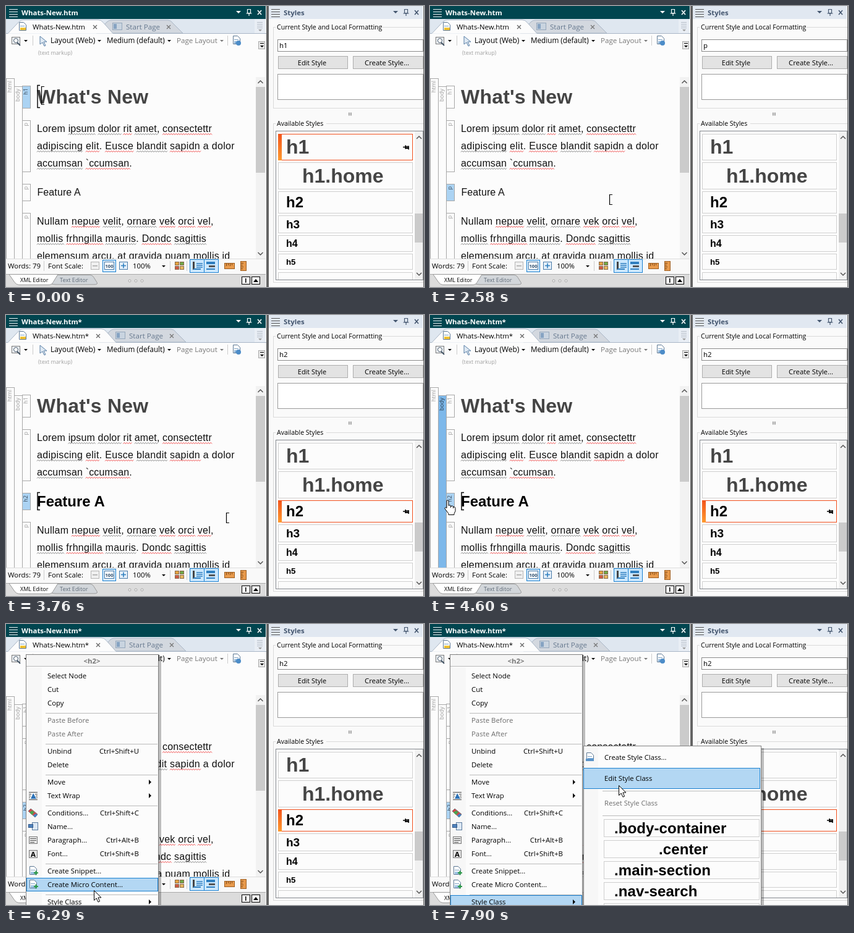
Animation of 676x455 px, one loop 8000 ms. Source, as an HTML page:

```html
<!DOCTYPE html>
<html lang="en">
<head>
<meta charset="utf-8">
<title>Editor</title>
<style>
html, body { margin: 0; width: 100%; height: 100%; overflow: hidden; background: #fcfcfc; }
svg { display: block; width: 676px; height: 455px; }
text { font-family: "Open Sans", "Noto Sans", sans-serif; white-space: pre; }
.doc { font-family: "Liberation Sans", Arial, sans-serif; }
</style>
</head>
<body>
<svg id="stage" viewBox="0 0 676 455" xmlns="http://www.w3.org/2000/svg"></svg>
<script>
const LOOP = 8000;
const TEAL = '#00454f', BLUE = '#b3d7f3', EDGE = '#1a80d0', PAPER = '#fcfcfc', INK = '#000';

// Markup helpers
const esc = s => s.replace(/</g, '&lt;').replace(/>/g, '&gt;');
const fill = (x, y, w, h, c, more = '') =>
  `<rect x="${x}" y="${y}" width="${w}" height="${h}" fill="${c}" ${more}/>`;
const box = (x, y, w, h, c, line) =>
  fill(x + .5, y + .5, w - 1, h - 1, c, `stroke="${line}"`);
const path = (d, c = 'none', line = 'none', w = 1) =>
  `<path d="${d}" fill="${c}" stroke="${line}" stroke-width="${w}"/>`;
const text = (x, y, s, { size = 11.4, color = INK, bold, anchor = 'start', more = '' } = {}) =>
  `<text x="${x}" y="${y}" font-size="${size}" fill="${color}" font-weight="${bold ? 700 : 400}" text-anchor="${anchor}" ${more}>${esc(s)}</text>`;
const doc = (x, y, s, size, bold, color = '#000', gap = 0) =>
  text(x, y, s, { size, bold, color, more: `class="doc" letter-spacing="${gap}"` });
const during = (a, b, inner) => `<g data-a="${a}" data-b="${b}">${inner}</g>`;
const group = (id, inner) => `<g id="${id}">${inner}</g>`;
const shift = (dx, dy, inner) => `<g transform="translate(${dx} ${dy})">${inner}</g>`;
const down = (x, y, c = INK, r = 3) => path(`M${x - r} ${y}h${2 * r}l${-r} ${r}z`, c);
const cross = (x, y, c) => path(`M${x - 3} ${y - 3}l6 6m0 -6l-6 6`, 'none', c, 1.3);
const chevron = (x, y, dir) => path(`M${x - 4} ${y + 2 * dir}l4 ${-4 * dir}l4 ${4 * dir}`, 'none', '#555', 1.5);
const vline = (x, y, h, c = '#ccc') => fill(x, y, 1, h, c);

function titleBar(x, w, name, active) {
  const c = active ? '#fff' : '#44566f';
  const r = x + w;
  return fill(x, 0, w, 21, active ? TEAL : '#e1e8f1') +
    path(`M${x + 5} 5.5h14m-14 4h14m-14 4h14m-14 4h14`, 'none', active ? '#e8eef0' : '#555') +
    text(x + 25, 15, name, { bold: true, color: c }) +
    down(r - 44, 8, c, 4) +
    path(`M${r - 29.5} 5.5h5v6h-5zm-2 6.5h9m-4.5 0v4`, 'none', c, 1.2) +
    path(`M${r - 13} 7l6 7m0 -7l-6 7`, 'none', c, 1.6);
}

const page = (x, y, c) =>
  path(`M${x + .5} ${y + .5}h7l4 4v9h-11z`, '#fff', '#5d7894') +
  fill(x + 2, y + 6, 7, 1, '#7fa3c4') + fill(x + 2, y + 9, 9, 4, c);

function tabs(dirty) {
  const d = dirty ? 5 : 0;
  return path(`M${146 + d} 44l17 -18q3 -3 7 -3h${92}q5 0 8 5l16 16z`, '#d3d8df', '#a9b6c6') +
    path(`M0 44.5h3l18 -19q3 -3 7 -3h${121 + d}q5 0 8 4l16 18h250`, PAPER, '#a9b6c6') +
    page(21, 26, '#f2c232') +
    text(43, 38, dirty ? 'Whats-New.htm*' : 'Whats-New.htm') +
    cross(144 + d, 34, '#666') +
    shift(d, 0, box(172, 27, 16, 12, '#c9d4e0', '#95a7bb') + fill(174, 29, 5, 8, '#86a3c2') +
      text(194, 38, 'Start Page', { size: 11.6, color: '#66788e' }) + cross(263, 34, '#777'));
}

function toolbar() {
  const grey = '#777';
  return fill(0, 45, 420, 26, PAPER) +
    box(9, 50, 14, 12, '#eef3f8', '#777') + `<circle cx="16" cy="56" r="3.5" fill="#fff" stroke="#456"/>` +
    path('M18 59l5 5', 'none', '#456', 2) + down(32, 55) + vline(43, 48, 16) +
    path('M55 49v13l4 -3l3 6l2 -1l-3 -6h5z', '#dfe9f3', '#587ea5') +
    text(72, 60, 'Layout (Web)', { size: 11.9 }) + down(151, 55) +
    text(163, 60, 'Medium (default)', { size: 11.7 }) + down(264, 55) +
    text(276, 60, 'Page Layout', { color: grey, size: 11.6 }) + down(349, 55, grey) + vline(358, 48, 16) +
    page(367, 48, '#8fb6da') + `<circle cx="376" cy="60" r="4" fill="#4c8cc8"/>` +
    box(408, 57, 11, 13, '#e8e8e8', '#aaa') + fill(411, 60, 6, 1, INK) + down(414, 64) +
    text(52, 79, '(text markup)', { size: 8.8, color: '#a0a0a0' });
}

function tag(x, y, h, name, c = PAPER, ink = '#999') {
  return box(x, y, 14, h, c, '#a8a8a8') +
    `<g transform="translate(${x + 8.5} ${y + 4}) rotate(-90)">` +
    text(0, 0, name, { size: 9, color: ink, anchor: 'end' }) + '</g>';
}

const caret = (y, h, c = '#000') => path(`M55 ${y + .5}h-4v${h}h4`, 'none', c, 1.4);

// "*" marks a red underline, "~" a dark one
const LINES = [
  [204, 'Lorem ~ipsum ~dolor *rit ~amet, *consectettr', .14],
  [232, '~adipiscing *elit. *Eusce ~blandit *sapidn a dolor', .31],
  [260, '~accumsan *`ccumsan.', .15],
  [354, 'Nullam *nepue ~velit, ~ornare *vek *orci *vel,', .25],
  [382, '~mollis *frhngilla ~mauris. *Dondc ~sagittis', .28],
  [410, '~elemensum *arcu, at ~gravida *puam ~mollis id', .2]
];

function editor() {
  return fill(0, 71, 420, 339, PAPER) + toolbar() +
    tag(0, 117, 293, 'html') + tag(13, 130, 280, 'body') +
    during(4460, 4880, tag(13, 130, 280, 'body', '#7db8ea', '#234')) +
    tag(26, 129, 37, 'h1') + during(0, 1620, tag(26, 129, 37, 'h1', '#abd3f3', '#345')) +
    tag(26, 185, 84, 'p') + tag(26, 335, 75, 'p') +
    during(0, 1620, tag(26, 288, 28, 'p')) +
    during(1620, 3360, tag(26, 288, 28, 'p', '#abd3f3', '#345')) +
    during(3360, LOOP, tag(26, 288, 28, 'h2', '#abd3f3', '#345')) +
    doc(50, 158, "What's New", 32, true, '#454545', .2) +
    LINES.map(([y, s, gap]) => doc(50, y, s.replace(/[*~]/g, ''), 16, false, '#111', gap)
      .replace('<text', `<text data-line="${y}"`)).join('') +
    group('waves', '') +
    during(0, 3360, doc(50.5, 307, 'Feature A', 16, false, '#111', .1)) +
    during(3360, LOOP, doc(50, 310, 'Feature A', 24, true)) +
    during(0, 150, caret(128, 36)) + during(680, 1210, caret(128, 36)) +
    during(1620, 2180, caret(289, 23)) + during(2730, 3120, caret(289, 23)) +
    during(3120, 3360, path('M53 290.5h-3v22h3', 'none', '#999')) +
    during(3360, 3880, caret(287, 28)) + during(4320, 4880, caret(287, 28)) + during(5130, LOOP, caret(287, 28)) +
    fill(404, 115, 16, 295, '#f2f2f2') + fill(404, 131, 15, 139, '#cbcbcb') +
    chevron(411.5, 123, 1) + chevron(411.5, 401, -1);
}

function footer() {
  const blue = '#2f7fc0';
  const rows = (x, y) => path(`M${x} ${y}h10m-10 3h10m-10 3h10`, 'none', blue, 1.4);
  return fill(0, 410, 420, 24, '#f9f9f9') + fill(0, 409, 420, 1, '#ddd') +
    text(3, 425, 'Words: 79') + vline(61, 413, 16) + text(68, 425, 'Font Scale:') +
    box(137, 414, 14, 13, '#f0f0f0', '#b5b5b5') + fill(140, 420, 8, 1.5, '#aaa') +
    box(156, 411, 22, 20, '#d9ebfa', EDGE) + box(159, 414, 16, 13, '#fff', '#4a7ba8') +
    text(167, 424, '100', { size: 7.5, bold: true, color: '#246', anchor: 'middle' }) +
    box(183, 414, 14, 13, '#e5f0fa', '#4a7ba8') + path('M186 420.5h8m-4 -4v8', 'none', blue, 1.6) +
    text(205, 425, '100%') + down(255, 420) + vline(265, 413, 16) +
    [[273, 414, '#e3a340'], [281, 414, '#6ea848'], [273, 421, '#cf5a46'], [281, 421, '#e8b860']]
      .map(([x, y, c]) => box(x, y, 7, 6, c, '#8a6a4a')).join('') +
    vline(292, 413, 16) +
    box(297, 410, 24, 22, '#cce8ff', EDGE) + fill(302, 414, 3, 13, '#444') + rows(308, 417) + fill(303, 425, 12, 2, blue) +
    box(320, 410, 24, 22, '#cce8ff', EDGE) + fill(324, 414, 14, 4, blue) + fill(328, 420, 10, 3, '#555') + fill(324, 425, 14, 2, blue) +
    box(353, 416, 17, 10, '#e89a4c', '#9e5f22') + path('M356.5 417v4m3 -4v3m3 -3v4m3 -4v3', 'none', '#7a4514') +
    box(379, 413, 10, 16, '#e89a4c', '#9e5f22') + path('M380 416.5h4m-4 3h3m-3 3h4m-4 3h3', 'none', '#7a4514') +
    fill(0, 434, 420, 21, '#dcdcdc') + fill(0, 434, 420, 1, '#aaa') +
    path('M72 450l9 -14.5h55q4 0 6 4l5 8q2 3.5 -4 3.5h-63z', '#d2d6da', '#999') +
    path('M5 434.5l9 13q3 4 7 4h49q4 0 6 -4l8 -13z', '#fff', '#999') +
    text(23, 446.5, 'XML Editor', { size: 9 }) + text(87, 446.5, 'Text Editor', { size: 9.2, color: '#5f6b78' }) +
    [200, 210, 220].map(x => `<circle cx="${x}" cy="445" r="2" fill="#eee" stroke="#aaa"/>`).join('') +
    box(381, 438, 14, 13, '#f4f4f4', INK) + fill(387, 441, 1.5, 7, INK) +
    box(397, 438, 14, 13, '#f4f4f4', INK) + path('M400 447h8l-4 -5z', INK);
}

const ROWS = [
  [207, 43, 'h1', 453, 239, 32, '#454545'], [253, 44, 'h1.home', 479, 286, 32, '#454545'],
  [300, 36, 'h2', 453, 326, 24], [339, 29, 'h3', 453, 360, 19],
  [371, 27, 'h4', 453, 390, 16], [401, 26, 'h5', 453, 419, 13.3]
];
const pin = y => path(`M642 ${y}h4m0 -3v6m0 -2h5m0 -3v6m0 -5h-5v3h5`, 'none', '#000', 1.6);
const picked = (y, h) => box(440, y, 218, h, PAPER, '#f04e1c') +
  fill(440, y, 6, h, 'url(#ember)') + pin(y + h / 2);

function styles() {
  const frame = (y, h) => box(432, y, 250, h, 'none', '#dadada');
  const label = (y, s, w) => fill(436, y - 10, w, 13, '#fafafa') + text(438, y, s, { size: 10.55 });
  const [h1, , h2] = ROWS;
  return fill(425, 21, 251, 434, '#fafafa') +
    frame(34, 132) + label(38, 'Current Style and Local Formatting', 172) +
    box(439, 54, 236, 20, '#fff', '#8a8a8a') +
    [['h1', 0, 1770], ['p', 1770, 3360], ['h2', 3360, LOOP]]
      .map(([s, a, b]) => during(a, b, text(442, 68, s))).join('') +
    box(440, 81, 113, 21, '#e3e3e3', '#adadad') + text(495, 96, 'Edit Style', { size: 10.9, anchor: 'middle' }) +
    box(561, 81, 114, 21, '#e3e3e3', '#adadad') + text(616, 96, 'Create Style...', { anchor: 'middle' }) +
    box(439, 110, 236, 42, '#fff', '#9a9a9a') +
    path('M554.5 172.5v5m2 -5v5m2 -5v5', 'none', '#888') +
    frame(190, 258) + label(194, 'Available Styles', 82) +
    box(436, 202, 239, 242, '#fff', '#82868c') +
    ROWS.map(([y, h]) => box(440, y, 218, h, PAPER, '#cfcfcf')).join('') +
    path('M440.5 443v-11.5h217v11.5', PAPER, '#cfcfcf') +
    during(0, 1770, picked(h1[0], h1[1])) +
    group('rowHover', box(440, 300, 218, 36, '#fcfdff', '#9ab') + fill(440, 300, 6, 36, '#7fb8ec') + pin(318)) +
    during(3360, LOOP, picked(h2[0], h2[1])) +
    ROWS.map(([, , s, x, y, size, c]) => doc(x, y, s, size, true, c)).join('') +
    fill(661, 203, 13, 240, '#f1f1f1') + fill(661, 336, 13, 47, '#cbcbcb') +
    chevron(668, 213, 1) + chevron(668, 434, -1);
}

// baseline, label, shortcut ('>' opens a submenu), disabled
const ITEMS = [
  [88, 'Select Node'], [110, 'Cut'], [132, 'Copy'],
  [160, 'Paste Before', '', 1], [182, 'Paste After', '', 1],
  [210, 'Unbind', 'Ctrl+Shift+U'], [232, 'Delete'],
  [260, 'Move', '>'], [282, 'Text Wrap', '>'],
  [310, 'Conditions...', 'Ctrl+Shift+C'], [332, 'Name...'],
  [354, 'Paragraph...', 'Ctrl+Alt+B'], [376, 'Font...', 'Ctrl+Shift+B'],
  [404, 'Create Snippet...'], [426, 'Create Micro Content...'], [454, 'Style Class', '>']
];

function menu() {
  const item = ([y, s, key, off]) => {
    const color = off ? '#6d6d6d' : INK;
    return text(67, y, s, { color }) + (key === '>' ? path(`M231 ${y - 8}v8l4 -4z`, INK)
      : key ? text(215, y, key, { anchor: 'end' }) : '');
  };
  const green = y => page(38, y, '#9fc4e4') + path(`M45 ${y + 11}h7m-3.5 -3.5v7`, 'none', '#2c9c46', 2);
  return fill(36, 53, 215, 402, '#000', 'opacity=".25"') + box(32, 49, 215, 420, PAPER, '#808080') +
    fill(33, 70, 25, 385, '#f7f7f7') + fill(33, 50, 213, 19, '#f5f5f5') + fill(33, 68, 213, 1, '#bbb') +
    text(139, 64, '<h2>', { bold: true, color: '#777', anchor: 'middle' }) +
    fill(33.5, 0, 212, 21, BLUE, `id="itemHover" stroke="${EDGE}"`) +
    [144, 194, 244, 294, 388, 438].map(y => fill(64, y, 181, 1, '#bbb')).join('') +
    ITEMS.map(item).join('') +
    path('M37 272.5h14m-14 3h4m6 0h4m-14 3h3m8 0h3m-14 3h2m10 0h2m-14 3h14', 'none', '#444') +
    path('M40 283l4 -9l5 9z', '#2d73b8') +
    path('M36 303l4 -4l11 9l-4 5z', '#d9434a', '#777') + path('M38 305l4 -3l4 3l-4 4z', '#4aa350') + path('M44 310l4 -3l3 2l-4 4z', '#4285c5') +
    box(42, 321, 10, 13, '#dce8f4', '#5d7da0') + box(36, 324, 8, 6, '#4f83bd', '#34598a') +
    box(37, 344, 14, 12, '#e9e9e9', '#777') + path('M39 347.5h10m-10 3h10m-10 3h7', 'none', '#555') +
    box(37, 366, 14, 13, '#e4e4e4', '#777') + text(44, 377, 'A', { bold: true, anchor: 'middle' }) +
    green(392) + green(414);
}

function submenu() {
  const names = [['.body-container', 298], ['.center', 370], ['.main-section', 298], ['.nav-search', 298]];
  return fill(252, 201, 288, 254, '#000', 'opacity=".25"') + box(248, 197, 288, 270, PAPER, '#808080') +
    fill(249, 198, 23, 257, '#f7f7f7') +
    fill(248.5, 0, 285, 33, BLUE, `id="subHover" stroke="${EDGE}"`) +
    page(253, 208, '#7fb0de') + fill(252, 218, 13, 4, '#5b93c8') +
    text(282, 220, 'Create Style Class...', { size: 11.2 }) + text(282, 254, 'Edit Style Class', { size: 11.2 }) +
    text(282, 294, 'Reset Style Class', { size: 11.2, color: '#6d6d6d' }) +
    fill(279, 270, 255, 1, '#bbb') + fill(279, 310, 255, 1, '#bbb') +
    names.map(([s, x], i) => box(281, 316 + 34 * i, 252, 29, PAPER, '#cfcfcf') +
      doc(x, 339 + 34 * i, s, 24, true, INK, .1)).join('') +
    box(281, 452, 252, 29, PAPER, '#cfcfcf');
}

const stage = document.getElementById('stage');
const $ = id => document.getElementById(id);
stage.innerHTML =
  `<defs><linearGradient id="ember" x2="0" y2="1"><stop stop-color="#f2541c"/><stop offset="1" stop-color="#ff9a2e"/></linearGradient></defs>` +
  fill(0, 0, 676, 455, PAPER) + fill(0, 21, 420, 24, '#dfe7f0') +
  during(0, 3360, tabs(false)) + during(3360, LOOP, tabs(true)) +
  fill(402, 21, 18, 23, '#e9eef5') + path('M406 26.5h9m-9 3h9m-9 3h9m-9 3h9', 'none', '#b4bcc6') + down(411, 38, '#999') +
  editor() + footer() + styles() +
  during(0, 3120, titleBar(0, 420, 'Whats-New.htm', true) + titleBar(424, 250, 'Styles', false)) +
  during(3120, 3360, titleBar(0, 420, 'Whats-New.htm', false) + titleBar(424, 250, 'Styles', true)) +
  during(3360, LOOP, titleBar(0, 420, 'Whats-New.htm*', true) + titleBar(424, 250, 'Styles', false)) +
  fill(421, 0, 4, 455, '#646464') + vline(675, 0, 455, '#646464') +
  during(5430, LOOP, menu()) + during(6840, LOOP, submenu()) +
  group('beam', '') +
  group('arrow', path('M.5 .5v16l3.7 -3.5l2.8 6.2l2.6 -1.2l-2.7 -6h5z', '#fff', '#000')) +
  group('hand', path('M5 1.5q2 -2 3 1v7q3 -2 4 1q3 -1 4 1q3 0 3 3v4l-2 4v2h-9v-2l-6 -8q0 -3 3 -1z', '#fff', '#000') +
    path('M11.5 10v3m4 -2v3', 'none', '#000'));

function drawWaves() {
  let out = '';
  for (const [y, line, gap] of LINES) {
    const node = stage.querySelector(`[data-line="${y}"]`);
    let at = 0;
    for (const word of line.split(' ')) {
      const bare = word.replace(/[*~]/, '');
      if (bare !== word) {
        const x = node.getStartPositionOfChar(at).x;
        const w = node.getSubStringLength(at, bare.replace(/[.,]$/, '').length) - gap;
        let d = `M${x} ${y + 4.5}`;
        for (let i = 0; i < w / 2; i++) d += `l2 ${i % 2 ? 2 : -2}`;
        out += path(d, 'none', word[0] === '*' ? '#f03434' : '#777', .9);
      }
      at += bare.length + 1;
    }
  }
  $('waves').innerHTML = out;
}
drawWaves();

// first step, last step, number of steps, end x, end y
const MOVES = [
  [560, 1340, 7, 52, 288], [2040, 2870, 7, 468, 317],
  [3490, 4020, 5, 281, 322], [4180, 4600, 4, 22, 299],
  [5890, 6290, 4, 142, 431], [6410, 6530, 2, 150, 446],
  [6970, 7360, 4, 261, 413], [7490, 7750, 3, 299, 287], [7900, 7900, 1, 305, 261]
];

function pointer(t) {
  let x = 57, y = 130;
  for (const [a, b, n, ex, ey] of MOVES) {
    if (t < a) break;
    const step = n > 1 ? (b - a) / (n - 1) : 1;
    const k = Math.min(n, Math.floor((t - a) / step + .001) + 1) / n;
    x += (ex - x) * k;
    y += (ey - y) * k;
    if (k < 1) break;
  }
  return [Math.round(x), Math.round(y)];
}

const show = (id, yes) => $(id).setAttribute('display', yes ? 'inline' : 'none');
const timed = [...stage.querySelectorAll('[data-a]')].map(el => [el, +el.dataset.a, +el.dataset.b]);

function render(t) {
  for (const [el, a, b] of timed) el.setAttribute('display', t >= a && t < b ? 'inline' : 'none');

  const [x, y] = pointer(t);
  const inMenu = t >= 5890;
  const kind = inMenu || x > 403 ? 'arrow' : x < 42 ? 'hand' : 'beam';
  for (const id of ['arrow', 'hand', 'beam']) show(id, id === kind);
  $(kind).setAttribute('transform', `translate(${x} ${y})`);
  if (kind === 'beam') {
    const h = t < 1340 ? 29 - 13 * (y - 130) / 158 : 16;
    $('beam').innerHTML = path(`M5 .5h-4.5v${h}h4.5`, 'none', '#000', 1.2);
  }
  show('rowHover', t < 3360 && x > 440 && y >= 300);

  const inSub = t >= 6840 && x >= 248;
  const rowY = inSub ? (t < 7490 ? 426 : 454) : y;
  const hit = inMenu && x > 32 && ITEMS.find(([b]) => rowY >= b - 15 && rowY < b + 7);
  show('itemHover', !!hit);
  if (hit) $('itemHover').setAttribute('y', hit[0] - 14.5);

  const top = y >= 311 ? 313 + 34 * Math.floor((y - 311) / 34) : y < 233 ? 199 : y < 267 ? 233 : 0;
  show('subHover', inSub && top > 0);
  $('subHover').setAttribute('y', top + .5);
}

function tick(now) {
  render(now % LOOP);
  requestAnimationFrame(tick);
}
render(0);
requestAnimationFrame(tick);
</script>
</body>
</html>
```
